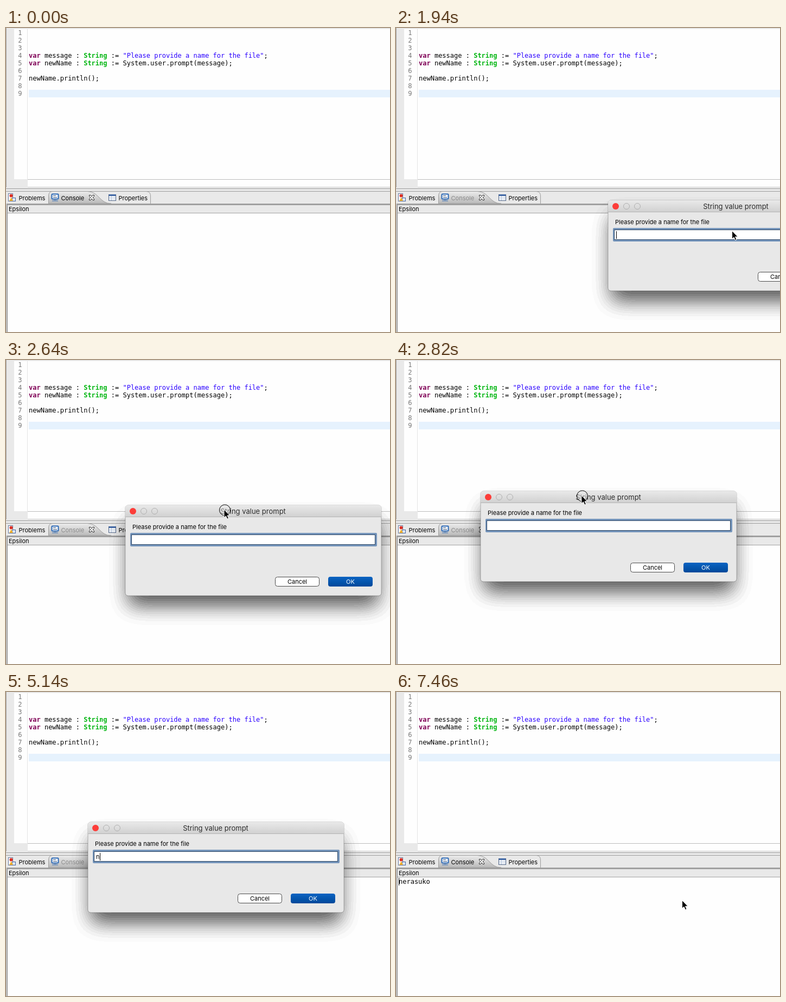
These frames come from a looping animation (708x561 px, 8000 ms). An HTML page:

```html
<!DOCTYPE html>
<html lang="en">
<head>
<meta charset="utf-8">
<title>Prompt dialog</title>
<style>
html, body { margin: 0; width: 100%; height: 100%; overflow: hidden; background: #fff; }
svg { display: block; width: 708px; height: 561px; }
text { white-space: pre; font: 11px Inter, sans-serif; fill: #000; }
.code, .code text { font: 12px "DejaVu Sans Mono", monospace; }
.num { fill: #787878; text-anchor: end; }
.key { font-weight: bold; fill: #7f0055; }
.type { font-weight: bold; fill: #00b50f; }
.str { fill: #2a00ff; }
.mid { text-anchor: middle; }
</style>
</head>
<body>
<svg viewBox="0 0 708 561">
  <defs>
    <linearGradient id="tabFill" x2="0" y2="1"><stop stop-color="#ececec"/><stop offset="1" stop-color="#b9b9b9"/></linearGradient>
    <linearGradient id="barFill" x2="0" y2="1"><stop stop-color="#e9e9e9"/><stop offset="1" stop-color="#d0d0d0"/></linearGradient>
    <linearGradient id="okFill" x2="0" y2="1"><stop stop-color="#0a63c2"/><stop offset="1" stop-color="#00489a"/></linearGradient>
    <filter id="shadow" filterUnits="userSpaceOnUse" x="-80" y="-60" width="632" height="340">
      <feGaussianBlur in="SourceAlpha" stdDeviation="20"/>
      <feOffset dy="24"/>
      <feComponentTransfer><feFuncA id="bands" type="discrete"/></feComponentTransfer>
    </filter>
  </defs>

  <!-- editor -->
  <rect width="708" height="561" fill="#fefefe"/>
  <rect width="708" height="1.5" fill="#e2e2e2"/>
  <path d="M0 0H15V279H40V294H0Z" fill="#e9e9e9"/>
  <path d="M39.5 2V279" stroke="#e4e4e4"/>
  <path d="M.5 0V296" stroke="#a3a3a3"/>
  <path d="M40 279.5H708" stroke="#bcbcbc"/>
  <rect x="42" y="114" width="666" height="14" fill="#e6f2fd"/>
  <g class="code" id="code"></g>

  <!-- view tabs -->
  <rect y="294" width="708" height="33" fill="#e9e9e9"/>
  <path d="M40 293.5H708" stroke="#d2d2d2"/>
  <path d="M0 296.5H708M0 301.5H708" stroke="#9c9c9c"/>
  <path d="M259 301.5Q266.5 302 266.5 310V324" fill="none" stroke="#9c9c9c"/>
  <path d="M78.5 324V309Q79 301.5 86 301.5H150C172 302 172 324 194 324Z" fill="url(#tabFill)" stroke="#9c9c9c"/>
  <rect y="324" width="708" height="3" fill="#a0a0a0"/>
  <rect y="327" width="708" height="14" fill="#e9e9e9"/>
  <path d="M0 341.5H708" stroke="#a3a3a3"/>
  <rect y="324" width="1" height="237" fill="#dedede"/>
  <rect x="1" y="324" width="2" height="237" fill="#9f9f9f"/>
  <text x="23.5" y="318">Problems</text>
  <text x="101.5" y="318" id="consoleTab">Console</text>
  <text x="207.5" y="318">Properties</text>
  <text x="5" y="338">Epsilon</text>

  <g>
    <rect x="4.5" y="305.5" width="8" height="14" fill="#fff" stroke="#68789c"/>
    <rect x="11.5" y="313.5" width="6" height="6" fill="#dce7f7" stroke="#4a68a0"/>
    <circle cx="9.5" cy="309.5" r="3" fill="#dc3026"/>
    <path d="M9.5 312.5L13 319H6Z" fill="#f5b32c"/>
  </g>
  <g>
    <rect x="84.5" y="306.5" width="12" height="9" rx="1" fill="#fff" stroke="#2b68b5" stroke-width="2"/>
    <path d="M87 309.5H92M87 312.5H94" stroke="#35527a"/>
    <path d="M88 316H93V318H96V320H85V318H88Z" fill="#7b98bd"/>
  </g>
  <path d="M153.5 308.5H156L158 311L160 308.5H162.5V310.5L160 313L162.5 315.5V317.5H160L158 315L156 317.5H153.5V315.5L156 313L153.5 310.5Z" fill="#fff" stroke="#222"/>
  <g>
    <rect x="189.5" y="307.5" width="13" height="11" fill="#fff" stroke="#4c6286"/>
    <rect x="190" y="307" width="12" height="3" fill="#3f67a5"/>
    <path d="M194.5 310V318M190 312.5H202M190 315.5H202" stroke="#b7c7de"/>
  </g>

  <text class="code" x="5" y="354" id="output"></text>
  <path id="outputCaret" d="M5.5 343V357" stroke="#000"/>

  <!-- prompt -->
  <g id="dialog">
    <rect width="472" height="167" rx="5" filter="url(#shadow)"/>
    <rect width="472" height="167" rx="5" fill="#e8e8e8" stroke="#000" stroke-opacity=".25"/>
    <path d="M0 22V5Q0 0 5 0H467Q472 0 472 5V22Z" fill="url(#barFill)"/>
    <path d="M0 21.5H472" stroke="#b4b4b4"/>
    <circle cx="14" cy="11" r="6" fill="#fc3d39"/>
    <g fill="none" stroke="#b0b0b0"><circle cx="34" cy="11" r="5.5"/><circle cx="54" cy="11" r="5.5"/></g>
    <text class="mid" x="235.5" y="16" style="font-size:13px;fill:#2c2c2c">String value prompt</text>
    <text x="13" y="44">Please provide a name for the file</text>
    <rect x="9" y="51" width="455" height="25" rx="2" fill="#7595bb"/>
    <rect x="11.5" y="54.5" width="449" height="18" fill="#fff" stroke="#2b4564"/>
    <text x="15" y="68" id="field"></text>
    <path id="fieldCaret" d="M.5 57V71" stroke="#000"/>
    <rect x="276.5" y="132.5" width="81" height="17" rx="4" fill="#fff" stroke="#4a4a4a"/>
    <text class="mid" x="317" y="145">Cancel</text>
    <rect id="ok" x="374" y="132" width="82" height="18" rx="4" fill="url(#okFill)"/>
    <text class="mid" x="415" y="145" style="fill:#fff">OK</text>
  </g>

  <!-- pointer -->
  <g id="pointer">
    <circle id="press" cx="1.5" cy="1" r="10" fill="#e4e4e4" fill-opacity=".45" stroke="#000"/>
    <path d="M0 0V15L3.4 11.8L5.9 17.3L8.4 16.2L6 10.9H10.6Z" fill="#000" stroke="#fff"/>
  </g>
</svg>
<script>
const LOOP = 8000;
const NAME = "nerasuko";

// Moments in ms
const FOCUS = 500, OPEN = 860, ENTER = 1310, GRAB = 2120, DROP = 2900, SETTLE = 2990,
      HIDE = 3530, TYPE = 5140, RETURN = 6560, CLICK = 7100, RELEASE = 7190,
      CLOSE = 7370, PRINT = 7460;
const KEY_STEP = 88, BLINK = 535;

const $ = id => document.getElementById(id);
const show = (id, on) => $(id).setAttribute("visibility", on ? "inherit" : "hidden");
const move = (id, [x, y]) => $(id).setAttribute("transform", `translate(${x} ${y})`);
const within = (t, from, to) => t >= from && t < to;
const mix = (a, b, u) => a + (b - a) * u;

// Progress 0..1 held in n equal steps
const stepped = (t, from, to, n) =>
  Math.min(1, Math.max(0, Math.floor((t - from) / (to - from) * n + 0.1) / n));

// Point on a Bezier curve of any degree
function curve(points, u) {
  if (points.length === 1) return points[0];
  const next = points.slice(1).map(([x, y], i) => [mix(points[i][0], x, u), mix(points[i][1], y, u)]);
  return curve(next, u);
}

// S-shaped drag up and left; the vertical part lags by the power bend
function drag([x, y], t, scale, slope, bend) {
  const u = stepped(t, GRAB, DROP, 9);
  const p = u === 1 ? 1 : 1 - 1 / (1 + scale * (u / (1 - u)) ** slope);
  return [Math.round(x - 240 * p), Math.round(y - 78 * p ** bend)];
}

const dialogAt = t => drag([391, 318], t, 0.555, 2.16, 1.3);

function pointerAt(t) {
  if (t < GRAB) return curve([[141, 81], [420, 330], [760, 500], [573, 324]], stepped(t, ENTER, 2030, 8));
  if (t < SETTLE) return drag([573, 324], t, 0.763, 1.7, 1.45);
  if (t < HIDE) return curve([[333, 246], [357, 265], [333, 292.5]], stepped(t, DROP, 3260, 4));
  return curve([[440, 371.5], [500, 405], [527.5, 384.5]], stepped(t, RETURN, 7010, 5));
}

const keyTime = i => TYPE + KEY_STEP * Math.round(i * 10 / 7);
const typedCount = t => [...NAME].filter((_, i) => t >= keyTime(i)).length;

const code = [
  [4, [["key", "var"], ["", " message : "], ["type", "String"], ["", " := "],
       ["str", '"Please provide a name for the file"'], ["", ";"]]],
  [5, [["key", "var"], ["", " newName : "], ["type", "String"],
       ["", " := System.user.prompt(message);"]]],
  [7, [["", "newName.println();"]]]
];

function build() {
  const baseline = n => 14 * n - 1;
  let out = "";
  for (let n = 1; n <= 9; n++) out += `<text class="num" x="29.5" y="${baseline(n)}">${n}</text>`;
  for (const [n, parts] of code) {
    const spans = parts.map(([kind, s]) => `<tspan class="${kind}">${s}</tspan>`).join("");
    out += `<text x="42" y="${baseline(n)}">${spans}</text>`;
  }
  $("code").innerHTML = out;
  const levels = Array.from({ length: 16 }, (_, i) => 0.65 * (i / 15) ** 1.3);
  $("bands").setAttribute("tableValues", levels.join(" "));
}

function draw(t) {
  const open = within(t, OPEN, CLOSE);
  show("dialog", open);
  move("dialog", dialogAt(t));
  $("consoleTab").style.fill = open ? "#8a8a8a" : "#000";

  const count = typedCount(t);
  const blinkStart = count ? keyTime(count - 1) : OPEN;
  $("field").textContent = NAME.slice(0, count);
  const width = count ? $("field").getComputedTextLength() : 0;
  move("fieldCaret", [15 + Math.round(width), 0]);
  show("fieldCaret", open && Math.floor((t - blinkStart) / BLINK) % 2 === 0);

  const clicking = within(t, CLICK, RELEASE);
  const visible = within(t, ENTER, HIDE) || t >= RETURN;
  show("pointer", visible);
  move("pointer", pointerAt(t));
  show("press", visible && (clicking || within(t, GRAB, DROP)));
  $("ok").setAttribute("fill", clicking ? "#003f88" : "url(#okFill)");

  $("output").textContent = t >= PRINT ? NAME : "";
  show("outputCaret", t >= PRINT || within(t, FOCUS, OPEN));
}

build();
const start = performance.now();
function tick() {
  draw((performance.now() - start) % LOOP);
  requestAnimationFrame(tick);
}
tick();
</script>
</body>
</html>
```
